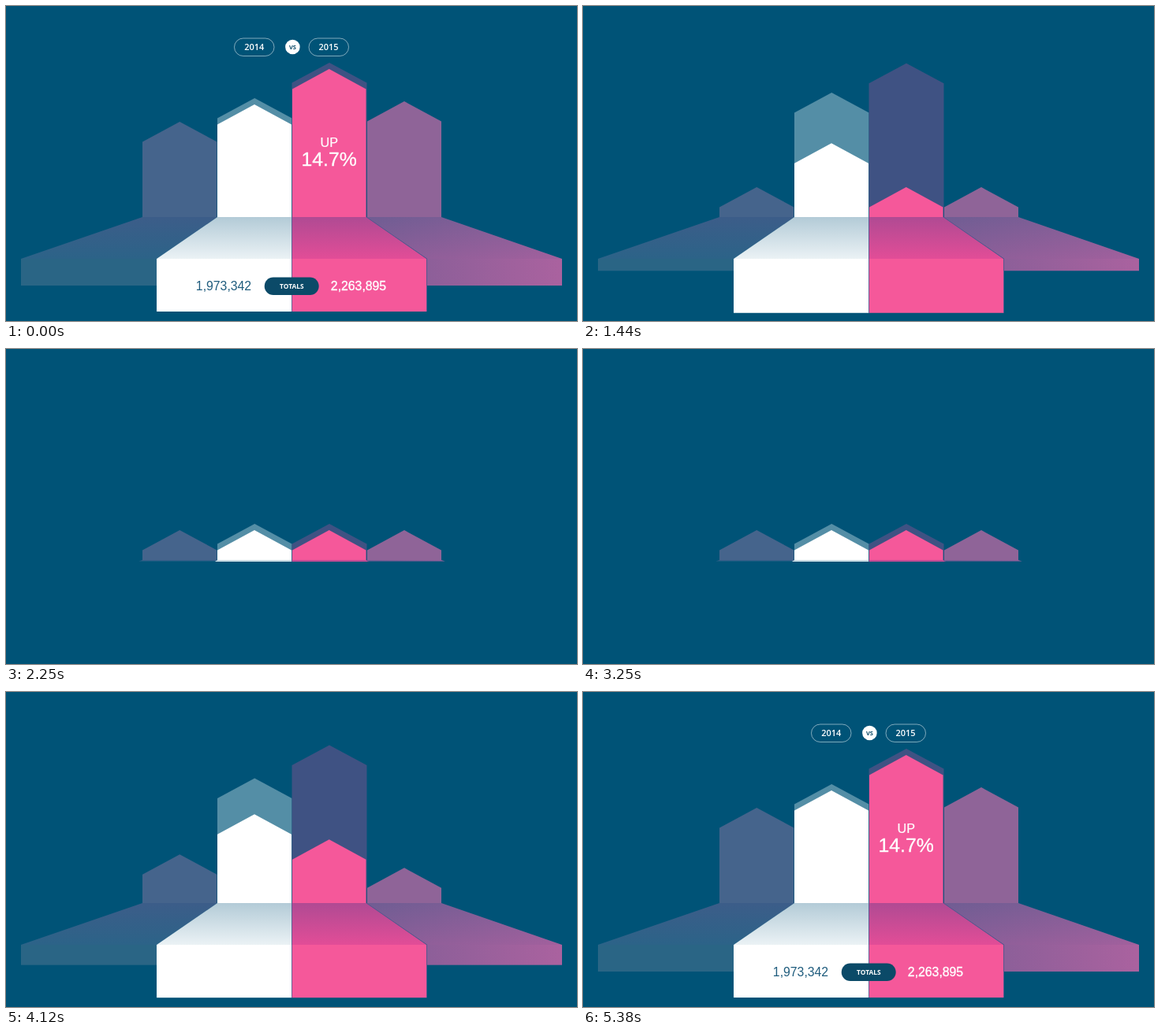
An HTML page for the animation above (7380 ms loop, 724 px wide and 400 px high).

```html
<!DOCTYPE html>
<html lang="en">
<head>
<meta charset="utf-8">
<title>2014 vs 2015</title>
<style>
  html, body { margin: 0; width: 100%; height: 100%; overflow: hidden; background: #005377; }
  svg { display: block; width: 100%; height: 100%; }
  text { text-anchor: middle; }
  .sans { font-family: "Liberation Sans", Arial, sans-serif; fill: #fff; }
  .label { font-family: "Open Sans", sans-serif; font-weight: 600; fill: #fff; }
  .outline { fill: none; stroke: #fff; stroke-opacity: .5; }
</style>
</head>
<body>
<svg viewBox="0 0 724 400">
  <defs>
    <linearGradient id="whiteFloor" x2="0" y2="1">
      <stop stop-color="#b3cbd7"/><stop offset="1" stop-color="#ebf2f5"/>
    </linearGradient>
    <linearGradient id="pinkFloor" x2="0" y2="1">
      <stop stop-color="#b04a93"/><stop offset="1" stop-color="#e24d97"/>
    </linearGradient>
    <linearGradient id="leftFloor" x2="0" y2="1">
      <stop stop-color="#3c5d89"/><stop offset="1" stop-color="#2c6388"/>
    </linearGradient>
    <linearGradient id="rightFloor" x2="1" y2="1">
      <stop stop-color="#6f5d93"/><stop offset="1" stop-color="#a2609d"/>
    </linearGradient>
    <linearGradient id="rightFront">
      <stop stop-color="#8d5f99"/><stop offset="1" stop-color="#aa629f"/>
    </linearGradient>
  </defs>

  <path id="leftBar" fill="#45648c"/>
  <path id="rightBar" fill="#8f6498"/>
  <path id="whiteGhost" fill="#548ea6"/>
  <path id="pinkGhost" fill="#3f5283"/>
  <path id="whiteBar" fill="#fff"/>
  <path id="pinkBar" fill="#f5589a"/>

  <path id="leftPlane" fill="url(#leftFloor)"/>
  <path id="rightPlane" fill="url(#rightFloor)"/>
  <rect id="leftFace" x="19" y="321" width="172" fill="#2a6585"/>
  <rect id="rightFace" x="534" y="321" width="171" fill="url(#rightFront)"/>
  <path id="whitePlane" fill="url(#whiteFloor)"/>
  <path id="pinkPlane" fill="url(#pinkFloor)"/>
  <rect id="whiteFace" x="191" y="321" width="171.5" fill="#fff"/>
  <rect id="pinkFace" x="362.5" y="321" width="171" fill="#f5589a"/>
  <path id="seam" fill="none" stroke="#4d5890" stroke-opacity=".75"/>

  <g id="yearA">
    <rect class="outline" x="289.5" y="41" width="50.5" height="22.5" rx="11.25"/>
    <text class="label" x="314.7" y="56.2" font-size="11">2014</text>
  </g>
  <g id="yearB">
    <rect class="outline" x="384" y="41" width="50.5" height="22.5" rx="11.25"/>
    <text class="label" x="409" y="56.2" font-size="11">2015</text>
  </g>
  <g id="versus">
    <circle r="9.3" fill="#fff"/>
    <text class="label" y="2.7" font-size="7.5" style="fill:#0b4a68;font-weight:700">VS</text>
  </g>

  <text id="totalA" class="sans" x="276" y="361" font-size="15.8" style="fill:#1f5c7d">1,973,342</text>
  <text id="totalB" class="sans" x="447" y="361" font-size="15.8" stroke="#fff" stroke-width=".35">2,263,895</text>
  <rect id="pill" y="344.5" height="22.5" rx="11.25" fill="#0b4a68"/>
  <text id="pillText" class="label" x="362.3" y="359" font-size="8.4" style="font-weight:700">TOTALS</text>

  <text id="up" class="sans" x="409.8" y="179" font-size="16.2" stroke="#fff" stroke-width=".2">UP</text>
  <text id="percent" class="sans" x="409.6" y="202.5" font-size="24.8" stroke="#fff" stroke-width=".3">14.7%</text>
</svg>
<script>
const LOOP = 7380, STEP = 30, FLOOR = 268;
const CLOSED = 2250, OPENING = 3250, MIRROR = 5530;

const part = {};
document.querySelectorAll('svg [id]').forEach(el => part[el.id] = el);

const set = (id, attrs) => {
  for (const name in attrs) part[id].setAttribute(name, attrs[name]);
};
const clamp = x => Math.min(1, Math.max(0, x));
const span = (t, start, length) => clamp((t - start) / length);
const sine = p => (1 - Math.cos(Math.PI * p)) / 2;
const back = p => 1 + 2.4 * (p - 1) ** 3 + 1.4 * (p - 1) ** 2;
const mix = (a, b, p) => a + (b - a) * p;

// id, left, right, folded apex, full apex, start, length
const bars = [
  ['leftBar', 173, 267.5, 230, 147, 4090, 420],
  ['rightBar', 458, 552, 230, 121, 4114, 420],
  ['whiteGhost', 268, 362.5, 222, 117, 3754, 600],
  ['pinkGhost', 362.5, 457.5, 222, 72, 3844, 600],
  ['whiteBar', 268, 362, 230, 125, 4028, 420],
  ['pinkBar', 363, 456.5, 230, 80, 4090, 420]
];
// id, back left, back right, front left, front right, folded share, start, length
const planes = [
  ['leftPlane', 173, 268, 19, 191, .03, 3620, 380],
  ['rightPlane', 457, 552, 705, 534, .03, 3620, 380],
  ['whitePlane', 268, 362.5, 191, 362.5, .04, 3340, 480],
  ['pinkPlane', 362.5, 457, 362.5, 533.5, .04, 3340, 480]
];
// id, height, start
const faces = [
  ['leftFace', 34, 4060], ['rightFace', 34, 4060],
  ['whiteFace', 67, 3880], ['pinkFace', 67, 3880]
];

function drawPlane([id, a, b, c, d, folded, start, length], t) {
  const k = mix(folded, 1, sine(span(t, start, length)));
  const y = FLOOR + 53 * k;
  // Right-hand outer plane lists its outer front corner first.
  const [l, r] = c > d ? [d, c] : [c, d];
  set(id, { d: `M${a} ${FLOOR}H${b}L${mix(b, r, k)} ${y}H${mix(a, l, k)}Z` });
  return { x: mix(b, r, k), y };
}

function draw(t) {
  for (const [id, left, right, low, high, start, length] of bars) {
    const y = mix(low, high, back(span(t, start, length)));
    set(id, { d: `M${left} ${FLOOR}V${y + 25.5}L${(left + right) / 2} ${y}L${right} ${y + 25.5}V${FLOOR}Z` });
  }

  let corner;
  for (const plane of planes) corner = drawPlane(plane, t);
  let depth = 0;
  for (const [id, height, start] of faces) {
    depth = Math.max(0, height * back(span(t, start, 250)));
    set(id, { height: depth });
  }
  set('seam', {
    d: `M362.5 ${FLOOR}V${corner.y + depth}M457 ${FLOOR}L${corner.x} ${corner.y}v${depth}`
  });

  const slide = 46 * (1 - back(span(t, 4280, 420)));
  const yearFade = span(t, 4280, 120);
  set('yearA', { transform: `translate(${slide})`, opacity: yearFade });
  set('yearB', { transform: `translate(${-slide})`, opacity: yearFade });
  const pop = back(span(t, 4280, 420));
  set('versus', {
    transform: `translate(363.4 ${52 + 20 * (1 - pop)}) scale(${Math.min(1, Math.max(0, pop))})`,
    opacity: yearFade
  });

  const open = back(span(t, 4478, 340));
  const width = mix(22.5, 69, open);
  set('pill', { x: 362.2 - width / 2, width, opacity: span(t, 4440, 60) });
  set('pillText', { opacity: span(t, 4500, 100) });
  const push = 33 * (1 - open), totalFade = span(t, 4560, 120);
  set('totalA', { transform: `translate(${push})`, opacity: totalFade });
  set('totalB', { transform: `translate(${-push})`, opacity: totalFade });

  const rise = (id, start) => {
    const p = span(t, start, 160);
    set(id, { transform: `translate(0 ${12 * (1 - p)})`, opacity: p });
  };
  rise('up', 4640);
  rise('percent', 4740);
}

// The first part plays the opening backwards, then rests, then opens again.
function sceneTime(t) {
  if (t < CLOSED) return MIRROR - Math.floor(t / STEP) * STEP;
  if (t < OPENING) return OPENING;
  return OPENING + Math.floor((t - OPENING) / STEP) * STEP;
}

const begin = performance.now();
function tick() {
  draw(sceneTime((performance.now() - begin) % LOOP));
  requestAnimationFrame(tick);
}
tick();
</script>
</body>
</html>
```
